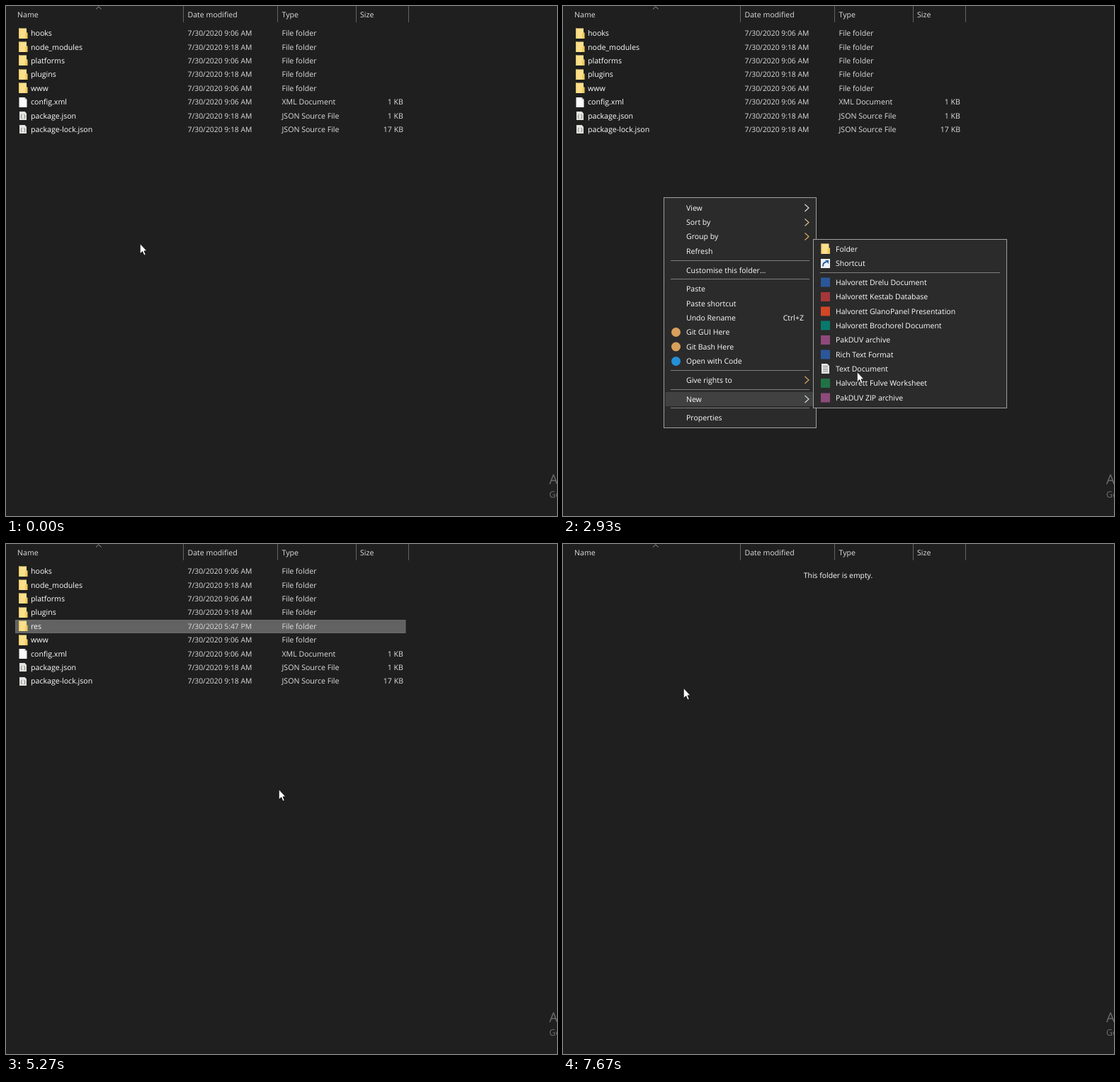
An HTML page for the animation above (8000 ms loop, 778x720 px).

```html
<!DOCTYPE html>
<html lang="en">
<head>
<meta charset="utf-8">
<title>Creating a folder</title>
<style>
  html, body { margin: 0; width: 100%; height: 100%; overflow: hidden; background: #1f1f1f; }
  svg { display: block; width: 100vw; height: 100vh; }
  text { font-family: "Open Sans", "Noto Sans", sans-serif; font-size: 10.6px; fill: #fff;
         text-rendering: geometricPrecision; white-space: pre; }
  .dim { fill: #dedede; }
  .date { font-size: 10.37px; }
  .menu { font-size: 10.5px; }
  .end { text-anchor: end; }
  .mid { text-anchor: middle; font-size: 10.4px; }
  .brace { font-size: 7px; fill: #555; text-anchor: middle; }
  .mark { fill: #6e6e6e; font-size: 19px; }
  .mark.small { font-size: 12.4px; }
</style>
</head>
<body>
<svg id="stage" viewBox="0 0 778 720"></svg>
<script>
const LOOP = 8000;
const ROW = 19.4, ITEM = 20.35, GAP = 6.4;

const files = [
  ['hooks', '9:06 AM'], ['node_modules', '9:18 AM'], ['platforms', '9:06 AM'],
  ['plugins', '9:18 AM'], ['www', '9:06 AM'],
  ['config.xml', '9:06 AM', 'XML Document', '1 KB'],
  ['package.json', '9:18 AM', 'JSON Source File', '1 KB'],
  ['package-lock.json', '9:18 AM', 'JSON Source File', '17 KB']
].map(([name, time, type = 'File folder', size = '']) => ({ name, time, type, size }));

// Timed tables: [ms, value...]; each entry holds until the next one.
const pointer = [
  [0, 189, 335], [730, 180, 322], [800, 163, 296], [870, 148, 278], [930, 142, 271],
  [1670, 150, 286], [1730, 178, 345], [1800, 215, 430], [1870, 250, 505], [1930, 270, 546], [2000, 278, 558],
  [2800, 305, 556], [2870, 385, 540], [2930, 415, 516], [3000, 420, 478], [3070, 414, 440],
  [3130, 403, 402], [3200, 391, 366], [3270, 386, 350], [3330, 385, 346],
  [5670, 345, 312], [5730, 232, 232], [5800, 112, 142], [5870, 44, 94],
  [6000, 43, 102], [6070, 42, 108], [6130, 42, 111],
  [6730, 70, 130], [6800, 120, 168], [6870, 157, 195], [6930, 170, 203]
];
const menuFade = [[0, 0], [1400, .35], [1470, .75], [1530, 1], [3600, 0]];
const subFade = [[0, 0], [2600, .35], [2670, .75], [2730, 1], [3600, 0]];
const ghostFade = [[0, 0], [3600, 1], [3670, .7], [3730, .37], [3800, .15], [3870, 0]];
const selectFade = [[0, 0], [3670, .35], [3730, .76], [3800, 1], [5200, .35], [5270, .76], [5330, 1]];
const typed = [[0, ''], [3670, 'New folder', 54], [4600, 'r', 4], [4730, 're', 10], [4800, 'res', 15], [5200, '']];

const at = (table, t) => table.findLast(entry => entry[0] <= t) || table[0];
const level = (table, t) => at(table, t)[1];

const rect = (x, y, w, h, fill, more = '') =>
  `<rect x="${x}" y="${y}" width="${w}" height="${h}" fill="${fill}" ${more}/>`;
const path = (d, fill, stroke = 'none', width = 1) =>
  `<path d="${d}" fill="${fill}" stroke="${stroke}" stroke-width="${width}"/>`;
const label = (x, middle, text, cls = '') =>
  `<text x="${x}" y="${Math.round(middle + 3.7)}" class="${cls}">${text}</text>`;
const group = (content, opacity) => opacity ? `<g opacity="${opacity}">${content}</g>` : '';

// Icons are drawn around the point x, y.
const square = color => (x, y) => rect(x - 6.5, y - 6.5, 13, 13, color);
const disc = color => (x, y) => `<circle cx="${x}" cy="${y}" r="6.5" fill="${color}"/>`;
const folder = (x, y) =>
  rect(x - 6, y - 7.5, 11, 14.5, '#fbe08c') + rect(x - 6, y - 7.5, 1.5, 14.5, '#eccb6d') +
  path(`M${x + 3} ${y}l1.5 -1.5h2v8.5h-3.5z`, '#f3cb60');
const page = (x, y) =>
  path(`M${x - 5.5} ${y - 7}h8l3 3v11h-11z`, '#fafafa') + path(`M${x + 2.5} ${y - 7}v3h3z`, '#b5b5b5');
const script = (x, y) =>
  path(`M${x - 5} ${y - 6}h7.5l2.5 2.5v9.5h-10z`, '#e4e4e0') +
  `<text x="${x}" y="${y + 3}" class="brace">{ }</text>`;
const note = (x, y) =>
  path(`M${x - 5.5} ${y - 7}h8l3 3v11h-11z`, '#e6e6e6') +
  path(`M${x - 3.5} ${y - 3.5}h7m-7 2.5h7m-7 2.5h7m-7 2.5h7`, 'none', '#8c8c8c');
const shortcut = (x, y) =>
  rect(x - 6.5, y - 6.5, 13, 13, '#f0f0f0') +
  path(`M${x - 3.5} ${y + 4}q0 -6 5 -6`, 'none', '#1d5fa8', 2) +
  path(`M${x - .5} ${y - 4.5}h5v5z`, '#1d5fa8');

const item = (text, more = {}) => ({ text, ...more });
const branch = (text, arrow) => item(text, { arrow });
const gap = null;

function layout(x, y, w, h, top, entries) {
  let cursor = top;
  const rows = entries.map(entry => {
    const height = entry ? ITEM : GAP;
    const row = { ...entry, gap: !entry, mid: cursor + height / 2 };
    cursor += height;
    return row;
  });
  return { x, y, w, h, rows };
}

const menu = layout(142, 270, 216, 326, 274.8, [
  branch('View', '#e4e4e4'), branch('Sort by', '#e0c28e'), branch('Group by', '#e2b25c'), item('Refresh'), gap,
  item('Customise this folder...'), gap,
  item('Paste'), item('Paste shortcut'), item('Undo Rename', { keys: 'Ctrl+Z' }),
  item('Git GUI Here', { icon: disc('#d9a05b') }), item('Git Bash Here', { icon: disc('#d9a05b') }),
  item('Open with Code', { icon: disc('#2490d8') }), gap,
  branch('Give rights to', '#e6a965'), gap,
  branch('New', '#cfe0e0'), gap,
  item('Properties')
]);
const submenu = layout(353, 329, 274, 239, 332.8, [
  item('Folder', { icon: folder }), item('Shortcut', { icon: shortcut }), gap,
  item('Halvorett Drelu Document', { icon: square('#2b579a') }),
  item('Halvorett Kestab Database', { icon: square('#a4373a') }),
  item('Halvorett GlanoPanel Presentation', { icon: square('#d24726') }),
  item('Halvorett Brochorel Document', { icon: square('#087a6c') }),
  item('PakDUV archive', { icon: square('#8e4a7a') }),
  item('Rich Text Format', { icon: square('#2b579a') }),
  item('Text Document', { icon: note }),
  item('Halvorett Fulve Worksheet', { icon: square('#217346') }),
  item('PakDUV ZIP archive', { icon: square('#8e4a7a') })
]);

function menuRow(box, row, lit) {
  const right = box.x + box.w;
  if (row.gap) return rect(box.x + 10, Math.round(row.mid - .7), box.w - 20, 1, '#7d7d7d');
  const mid = Math.round(row.mid * 2) / 2;
  return (lit ? rect(box.x + 2.5, Math.round(mid - 10), box.w - 5, 20, '#414141') : '') +
    (row.icon ? row.icon(box.x + 17.5, mid) : '') +
    label(box.x + 32, mid, row.text, 'menu') +
    (row.keys ? label(right - 18, mid, row.keys, 'menu end') : '') +
    (row.arrow ? path(`M${right - 16.5} ${mid - 5}l5.5 5l-5.5 5`, 'none', row.arrow, 1.1) : '');
}

const rowUnder = (box, x, y) => x > box.x + 2 && x < box.x + box.w
  ? box.rows.find(row => !row.gap && Math.abs(row.mid - y) <= ITEM / 2) : undefined;

const drawMenu = (box, lit) =>
  rect(box.x + .5, box.y + .5, box.w - 1, box.h - 1, '#2b2b2b', 'stroke="#a0a0a0"') +
  box.rows.map(row => menuRow(box, row, row === lit)).join('');

function menus(t) {
  const open = level(subFade, t);
  const [, x, y] = at(pointer, t - 65);   // highlight trails the pointer
  const parent = open ? menu.rows.find(row => row.text === 'New') : rowUnder(menu, x, y);
  return group(drawMenu(menu, parent), level(menuFade, t)) +
    group(drawMenu(submenu, rowUnder(submenu, x, y)), open) +
    group(menuRow(submenu, submenu.rows[0], true), level(ghostFade, t));
}

const header =
  [['Name', 16], ['Date modified', 256.5], ['Type', 389.5], ['Size', 500]]
    .map(([text, x]) => label(x, 12, text, 'dim')).join('') +
  [250, 383, 494, 568].map(x => rect(x, 0, 1, 23, '#636363')).join('') +
  path('M127 4.5l3.8 -3.6l3.8 3.6', 'none', '#9a9a9a');
const watermark =
  '<text x="767" y="675" class="mark">A</text><text x="767" y="694" class="mark small">Go</text>';

function listing(t) {
  if (t < 3670) return files;
  const fresh = { name: 'res', time: '5:47 PM', type: 'File folder', size: '', fresh: true };
  return files.toSpliced(t < 5200 ? 1 : 4, 0, fresh);
}

function editor(t, mid) {
  const [, text, width] = at(typed, t);
  const top = Math.round(mid - 9);
  const selected = t < 4600;
  const caret = !selected || t < 4200;
  return rect(31.5, top + .5, width + 33, 17, '#191919', 'stroke="#fff"') +
    (selected ? rect(35, top + 2, width, 14, '#0078d7') : '') +
    label(35, mid, text) +
    (caret ? rect(35 + width, top + 2, 1, 14, '#fff') : '');
}

function fileRow(file, i, t, hover) {
  const mid = 38.5 + ROW * i;
  const top = Math.round(29 + ROW * i);
  const icon = file.type === 'File folder' ? folder : file.type === 'XML Document' ? page : script;
  const editing = file.fresh && t < 5200;
  let out = '';
  if (file.fresh) {
    out += group(rect(13.5, top + .5, 550.5, 18, '#777', 'stroke="#828282"'), level(selectFade, t));
  } else if (hover) {
    out += rect(13, top, 552, 19, '#4d4d4d');
  }
  return out + icon(24, Math.round(mid)) +
    (editing ? editor(t, mid) : label(35, mid, file.name)) +
    label(256.5, mid, '7/30/2020 ' + file.time, 'dim date') +
    label(389.5, mid, file.type, 'dim') +
    label(561, mid, file.size, 'dim end');
}

function content(t) {
  if (t >= 6670) return label(388.5, 44, 'This folder is empty.', 'mid');
  const [, x, y] = at(pointer, t);
  const over = x < 565 ? Math.floor((y - 29) / ROW) : -1;
  return listing(t).map((file, i) => fileRow(file, i, t, i === over)).join('');
}

function drawPointer(t) {
  const [, x, y] = at(pointer, t);
  if (t >= 7530 && t < 7670) {
    return `<circle cx="${x}" cy="${y}" r="7.5" fill="none" stroke="#2a9fd6" stroke-width="3.6"/>`;
  }
  return `<g transform="translate(${x} ${y})">` +
    path('M.3 .6V14.8L3.7 11.6L6 17L8.2 16L6 10.8H9.9Z', '#fff', '#000', .7) + '</g>';
}

const stage = document.getElementById('stage');
let shown = '';
function tick() {
  const t = performance.now() % LOOP;
  const picture = header + content(t) + watermark + menus(t) + drawPointer(t);
  if (picture !== shown) stage.innerHTML = shown = picture;
  requestAnimationFrame(tick);
}
tick();
</script>
</body>
</html>
```
